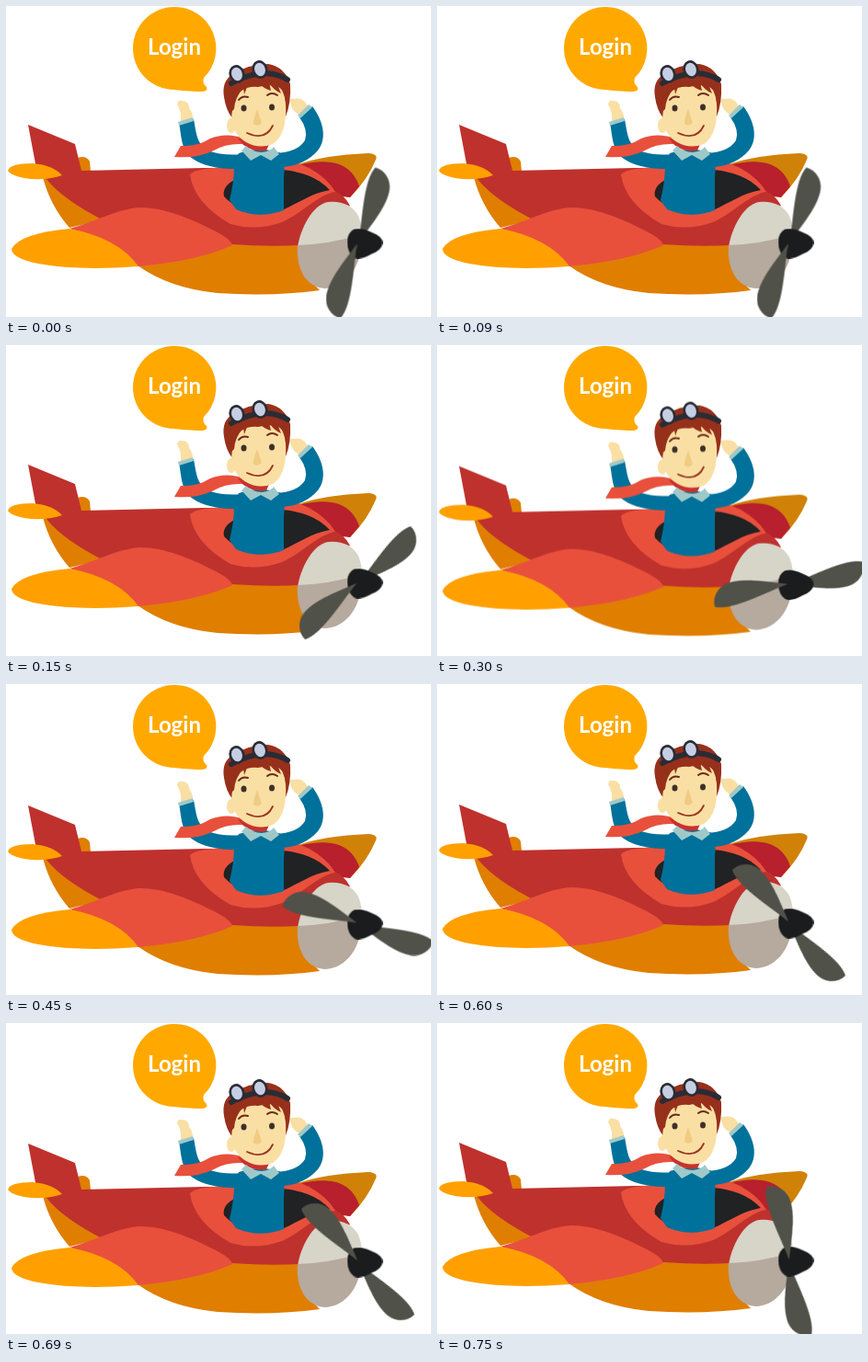
These frames come from a looping animation (462x338 px, 0.9 s). An HTML page without scripts:

```html
<!DOCTYPE html>
<html lang="en">
<head>
<meta charset="utf-8">
<title>Login pilot</title>
<style>
  html, body { margin: 0; width: 100%; height: 100%; overflow: hidden; background: #fff; }
  svg { display: block; width: 462px; height: 338px; }
  .label { font: 700 24px Lato, "Open Sans", sans-serif; fill: #fff; text-anchor: middle; }
  .red { fill: #bf312d; }
  .coral { fill: #e8503c; }
  .amber { fill: #ffa000; }
  .ochre { fill: #e07e00; }
  .blue { fill: #00719b; }
  .skin { fill: #f9dfa3; }
  .shade { fill: #f0cb83; }
  .hair { fill: #97301b; }
  .dark { fill: #202224; }
  .teal { fill: #9fc9c9; }
  .line { fill: none; stroke-linecap: round; }

  .plane { animation: bob 900ms step-end infinite; }
  .prop { fill: #505149; animation: spin 900ms steps(6) infinite; }
  @keyframes bob {
    0% { transform: translateY(0); }
    16.667% { transform: translateY(1px); }
    33.333% { transform: translateY(2.6px); }
    50% { transform: translateY(3px); }
    66.667% { transform: translateY(2px); }
    83.333% { transform: translateY(1px); }
  }
  /* two equal blades, so half a turn closes the loop */
  @keyframes spin { to { transform: rotate(180deg); } }
</style>
</head>
<body>
<svg viewBox="0 0 462 338">
  <defs>
    <path id="blade" d="M1-1 C5-26 6-68 19-82 C30-79 36-68 34.500-58 C32-42 20-26 1-1 Z"/>
    <g id="lens">
      <ellipse rx="8.500" ry="10" fill="#2a2c35"/>
      <ellipse rx="5.800" ry="7.300" fill="#c6cee3"/>
    </g>
  </defs>

  <g class="bubble">
    <path fill="#ffa900" d="M183 1 A45 45 0 0 1 215 78 Q213 84 218 88 Q220 92 214 93 Q202 93 183 91 A45 45 0 0 1 183 1 Z"/>
    <text class="label" x="183" y="53">Login</text>
  </g>

  <g class="plane">
    <g class="far-wing">
      <path fill="#d08208" d="M318 172 Q345 162 394 160 Q405 161 402 167 Q393 189 374 208 L340 200 Z"/>
      <path fill="#b7202c" d="M318 173 Q345 166 362 172 Q378 178 384 196 L374 208 L340 204 Z"/>
    </g>

    <g class="hull">
      <path class="ochre" d="M78 165 Q87 162 91 169 L92 180 H80 Z"/>
      <path class="ochre" d="M40 186 Q48 217 69 241 L110 231 Q75 206 62 186 Z"/>
      <path class="red" d="M24 129 L75 150 L82 179 L215 176 L330 175 L355 200 Q368 205 374 217 L345 232 L320 262 Q280 266 240 262 L110 235 Q62 211 44 188 L34 182 Z"/>
      <path class="amber" d="M2 179 Q4 171 29 171 Q51 173 61 184 Q48 189 28 188 Q7 186 2 179 Z"/>
      <path class="ochre" d="M143 282 Q190 274 246 259 Q284 262 320 260 Q321 290 341 309 Q290 316 230 312 Q178 307 143 282 Z"/>
    </g>

    <g class="near-wing">
      <path class="coral" d="M69 242 C96 235 122 220 146 219 C172 219 200 231 222 242 Q245 253 246 260 Q209 277 143 283 Q122 256 69 242 Z"/>
      <path class="amber" d="M6 264 Q15 247 69 242 Q122 252 144 283 Q78 288 35 280 Q6 274 6 264 Z"/>
    </g>

    <g class="cockpit">
      <path class="coral" d="M200 183 Q207 175 250 175 L318 171 Q346 182 358 202 C341 204 322 225 300 235 Q272 245 244 237 Q204 214 200 183 Z"/>
      <path class="dark" d="M237 207 C233 188 269 179 300 178 C326 180 343 190 352 200 C331 204 320 213 300 222 Q257 229 237 207 Z"/>
    </g>

    <g class="nose">
      <path fill="#d7d4c8" d="M317 262 C320 242 333 216 350 213 Q373 211 383 228 Q388 240 387 256 L350 268 Z"/>
      <path fill="#b6a99d" d="M317 260 Q352 259 387 248 C388 283 370 306 347 307 C325 306 315 284 317 260 Z"/>
    </g>

    <g class="pilot">
      <path class="skin" d="M190 125 Q191 115 186 107 Q187 102 191 103 Q199 103 199 111 Q204 117 203 124 Z"/>
      <path class="blue" d="M188 127 L204 123 C207 138 207 149 219 157 Q236 163 256 161 L256 177 Q220 178 203 166 C190 157 191 142 188 127 Z"/>
      <path class="teal" d="M187 126 L203 121 L204 125 L188 130 Z"/>
      <path class="skin" d="M321 119 Q312 116 309 106 Q307 100 313 101 Q324 98 329 111 Z"/>
      <path class="blue" d="M293 160 Q317 159 325 146 Q329 135 319 121 L333 109 C347 128 348 146 339 157 Q325 173 301 175 Z"/>
      <path class="teal" d="M317 119 L329 107 L333 110 L320 122 Z"/>
      <path class="blue" d="M253 160 Q277 152 299 160 Q304 168 302 187 L302 222 Q275 232 250 221 L243 211 Q248 191 248 173 Z"/>

      <path class="coral" d="M183 164 L190 152 Q208 153 222 144 Q239 137 260 144 L258 150 Q239 149 226 157 Q208 166 183 164 Z"/>
      <path fill="#c8322c" d="M252 144 L288 146 L283 157 Q271 160 258 151 Z"/>
      <path class="teal" d="M261 152 Q268 159 278 159 Q288 158 291 153 L297 161 L288 168 L277 162 L266 168 L256 157 Z"/>

      <path class="hair" d="M237 99 Q234 81 247 74 Q264 63 285 63 Q303 66 309 85 Q310 106 304 120 L246 122 Q239 113 237 99 Z"/>
      <ellipse class="skin" cx="245" cy="130" rx="5" ry="8"/>
      <path class="skin" d="M247 104 Q255 86 274 88 Q298 82 303 96 C306 119 304 141 290 150 Q275 156 261 148 Q247 140 245 122 Z"/>
      <path class="hair" d="M243 117 Q242 93 258 78 Q294 71 306 90 L304 105 Q302 91 295 85 L299 95 Q290 91 286 83 L288 92 Q279 89 275 84 L262 88 L259 96 L258 89 Q249 99 248 112 Z"/>

      <g class="line" stroke="#6c291a" stroke-width="2">
        <path d="M253 102 Q257 97 263 99"/>
        <path d="M284 97 Q289 93 295 97"/>
      </g>
      <ellipse cx="258.500" cy="111" rx="3" ry="3.500" fill="#3f3028"/>
      <ellipse cx="289" cy="110" rx="3" ry="3.500" fill="#3f3028"/>
      <path class="shade" d="M273 112 Q269 123 269 128 Q273 132 278 127 Z"/>
      <path class="line" stroke="#9b3420" stroke-width="1.800" d="M262 138 Q282 147 290 130"/>

      <path class="line" stroke="#2a2c35" stroke-width="6" d="M245 84 Q262 74 282 73 Q297 74 306 80"/>
      <use href="#lens" transform="translate(251 74) rotate(-18)"/>
      <use href="#lens" transform="translate(276 69) rotate(-18)"/>
    </g>

    <!-- one blade behind the hub, one in front -->
    <g transform="translate(382.500 257.500)">
      <use class="prop" href="#blade"/>
      <path fill="#1a1c1d" d="M-11.500 0 Q-12-11-4-15 Q4-17 14-12 Q27-7 27 0 Q26 8 15 12 Q3 19-4 16 Q-11 11-11.500 0 Z"/>
      <g class="prop"><use href="#blade" transform="rotate(180)"/></g>
    </g>
  </g>
</svg>
</body>
</html>
```
